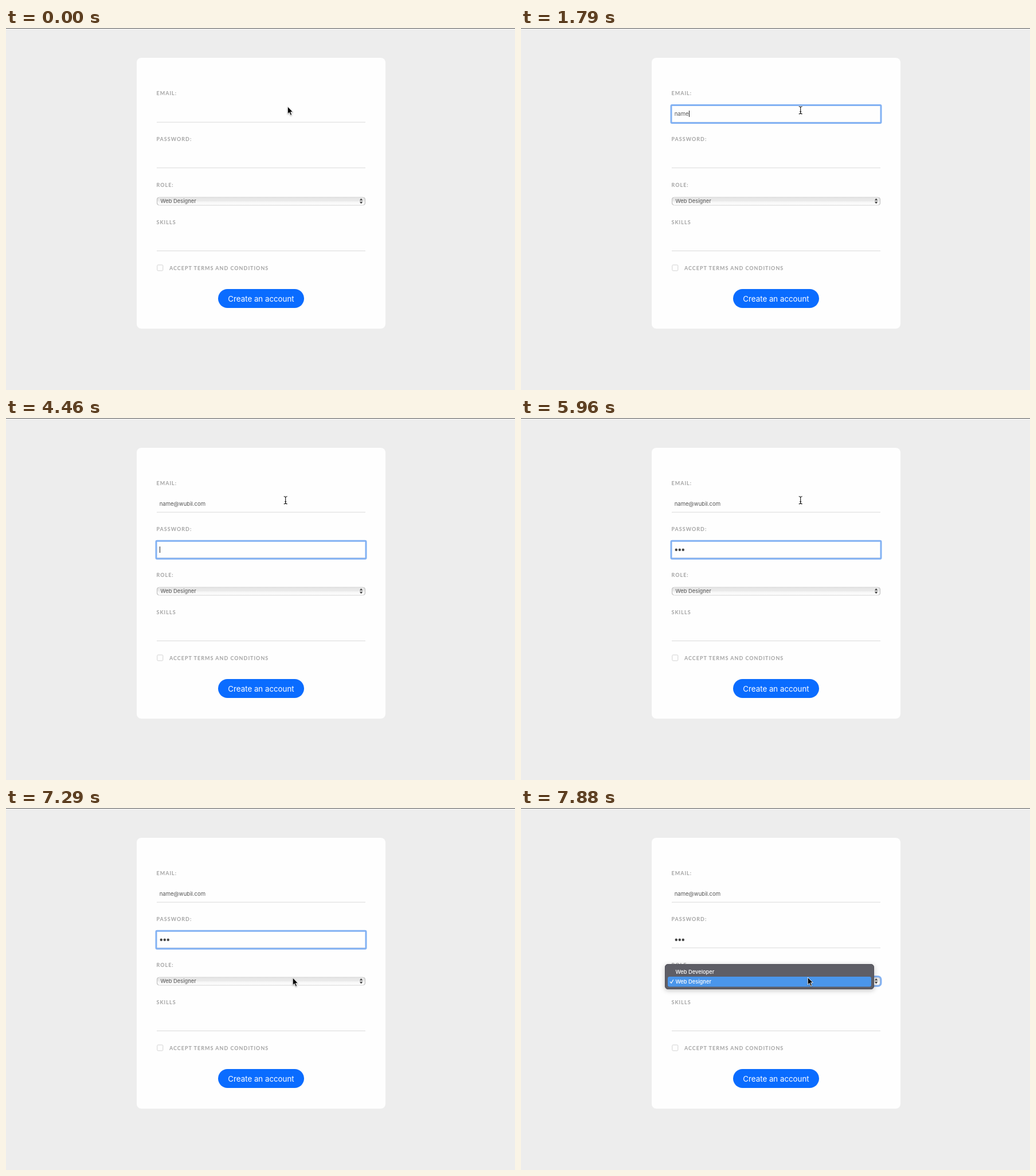
An HTML page that plays this animation: 888x631 px, repeating every 8 s.

```html
<!DOCTYPE html>
<html lang="en">
<head>
<meta charset="utf-8">
<title>Sign-up form</title>
<style>
  html, body { margin: 0; width: 100%; height: 100%; overflow: hidden; background: #ededed; }
  svg { display: block; width: 888px; height: 631px; }
  text { font: 9.55px Inter, "Liberation Sans", sans-serif; fill: #555; }
  .label { font: 700 9px Lato, "Open Sans", sans-serif; letter-spacing: 1px; fill: #a3a3a3; }
  .button { font-size: 13.3px; fill: #fff; text-anchor: middle; }
  .select { font-size: 9.4px; }
  .menu text { font-size: 9.3px; font-weight: 500; fill: #fff; }
  .ring { fill: none; stroke: #82b1f3; stroke-width: 3; }
  .panel { filter: drop-shadow(0 2px 4px rgba(0, 0, 0, .24)); }
  #arrow { filter: drop-shadow(0 1px .8px rgba(0, 0, 0, .3)); }
</style>
</head>
<body>
<svg viewBox="0 0 888 631">
  <defs>
    <linearGradient id="face" x2="0" y2="1">
      <stop offset="0" stop-color="#e5e5e5"/>
      <stop offset=".5" stop-color="#ebebeb"/>
      <stop offset=".55" stop-color="#f6f6f6"/>
      <stop offset="1" stop-color="#fdfdfd"/>
    </linearGradient>
  </defs>

  <rect width="888" height="631" fill="#ededed"/>
  <rect width="888" height="1" fill="#5a5a5a"/>
  <rect x="228" y="52" width="434" height="472" rx="8" fill="#fefefe"/>

  <g class="label-list">
    <text class="label" x="262.5" y="117">EMAIL:</text>
    <text class="label" x="262.5" y="197">PASSWORD:</text>
    <text class="label" x="262.5" y="276.5">ROLE:</text>
    <text class="label" x="262.5" y="341.5">SKILLS</text>
    <text class="label" x="285" y="421.5">ACCEPT TERMS AND CONDITIONS</text>
  </g>
  <path d="M263 164.2H627M263 243.8H627M263 388.5H627" stroke="#dadada"/>

  <rect x="263.5" y="295" width="363" height="14" rx="4" fill="url(#face)" stroke="#d6d6d6"/>
  <path d="M266 295.5Q263.5 296 263.5 299V305Q263.5 308 266 308.5M624 295.5Q626.5 296 626.5 299V305Q626.5 308 624 308.5" fill="none" stroke="#bdbdbd"/>
  <text class="select" x="269.5" y="305">Web Designer</text>
  <rect id="selectRing" class="ring" x="262" y="293.8" width="366" height="16.4" rx="5"/>
  <path d="M616.9 300.6L619.6 297 622.3 300.6ZM616.9 302.8L619.6 306.4 622.3 302.8Z" fill="#444"/>

  <rect x="263.8" y="413" width="10" height="10" rx="1.5" fill="#fefefe" stroke="#d2d2d2"/>
  <rect x="370" y="455" width="150" height="33" rx="16.5" fill="#0a6cff"/>
  <text class="button" x="445" y="476.6">Create an account</text>

  <rect id="ring" class="ring" x="262" y="134.5" width="366" height="31" rx="1.5"/>
  <text id="email" x="267.7" y="153.4"></text>
  <g id="dots" fill="#444"></g>
  <path id="caret" d="M.5 144V155" stroke="#222"/>

  <g id="menu" class="menu">
    <rect class="panel" x="251.5" y="272.5" width="364" height="43" rx="4.5" fill="#5e5e66" stroke="#4f4f58"/>
    <rect x="256" y="294" width="355" height="17.5" rx="3" fill="#4a96eb"/>
    <text x="269.5" y="288.6">Web Developer</text>
    <text x="269.5" y="305.8">Web Designer</text>
    <path d="M260 302.6L262.2 305.3 265.8 299.2" fill="none" stroke="#fff" stroke-width="1.2"/>
  </g>

  <path id="arrow" d="M0 0V13.2L3 10.4 5.2 15.4 7.4 14.5 5.3 9.6H9.3Z" stroke="#fff" stroke-width=".9"/>
  <g id="beam" fill="none">
    <path d="M-3 -6.5Q0 -6.5 0 -4.5Q0 -6.5 3 -6.5M0 -5V5M-3 6.5Q0 6.5 0 4.5Q0 6.5 3 6.5M-1.5 2.5H1.5" stroke="#fff" stroke-width="2.6" stroke-opacity=".8"/>
    <path d="M-3 -6.5Q0 -6.5 0 -4.5Q0 -6.5 3 -6.5M0 -5V5M-3 6.5Q0 6.5 0 4.5Q0 6.5 3 6.5M-1.5 2.5H1.5" stroke="#111" stroke-width="1.1"/>
  </g>
</svg>
<script>
const LOOP = 8000;
const ADDRESS = "name@wubil.com";
const $ = id => document.getElementById(id);

// Each row: start time, then the values held from there on.
const typed = [[0, 0], [1340, 2], [1490, 3], [1790, 4], [2230, 5], [2680, 6], [2830, 7], [3120, 8],
  [3270, 9], [3420, 10], [3710, 11], [3860, 12], [4010, 13], [4160, 14]];
const secret = [[0, 0], [4910, 1], [5210, 2], [5360, 3]];
const focus = [[0, ""], [440, "email"], [4460, "password"], [7440, "role"]];
const blink = [[0, 0], [440, 1], [1040, 0], [1340, 1], [5960, 0], [6400, 1], [6990, 0]];
const pointer = [[0, "arrow", 491.3, 136.8], [150, "beam", 489, 141], [295, "beam", 487.7, 143.2],
  [6400, "beam", 488.5, 163], [6550, "beam", 490.5, 226], [6700, "arrow", 493.2, 267.3],
  [6840, "arrow", 496, 281], [6990, "arrow", 499, 291], [7140, "arrow", 500.2, 295.8],
  [7740, "arrow", 500.2, 295.4], [7880, "arrow", 500.2, 295]];

const at = (track, t) => track.findLast(row => row[0] <= t).slice(1);
const show = (el, on) => el.style.display = on ? "" : "none";
const move = (el, x, y) => el.setAttribute("transform", `translate(${x} ${y})`);

for (let i = 0; i < 3; i++) {
  const dot = document.createElementNS("http://www.w3.org/2000/svg", "circle");
  dot.setAttribute("cx", 270.8 + i * 6);
  dot.setAttribute("cy", 229.8);
  dot.setAttribute("r", 2.2);
  $("dots").append(dot);
}

function draw(now) {
  const t = now % LOOP;
  const [field] = at(focus, t);
  const [count] = at(secret, t);
  const [kind, x, y] = at(pointer, t);
  const inPassword = field === "password";
  const inText = inPassword || field === "email";
  const shift = inPassword ? 79.7 : 0;

  $("email").textContent = ADDRESS.slice(0, at(typed, t)[0]);
  [...$("dots").children].forEach((dot, i) => show(dot, i < count));

  show($("ring"), inText);
  move($("ring"), 0, shift);
  show($("caret"), inText && at(blink, t)[0]);
  const end = inPassword ? count * 6 : $("email").getComputedTextLength();
  move($("caret"), Math.round(268 + end), Math.round(shift));

  show($("menu"), field === "role");
  show($("selectRing"), field === "role");
  for (const id of ["arrow", "beam"]) show($(id), id === kind);
  move($(kind), x, y);
  requestAnimationFrame(draw);
}
requestAnimationFrame(draw);
</script>
</body>
</html>
```
